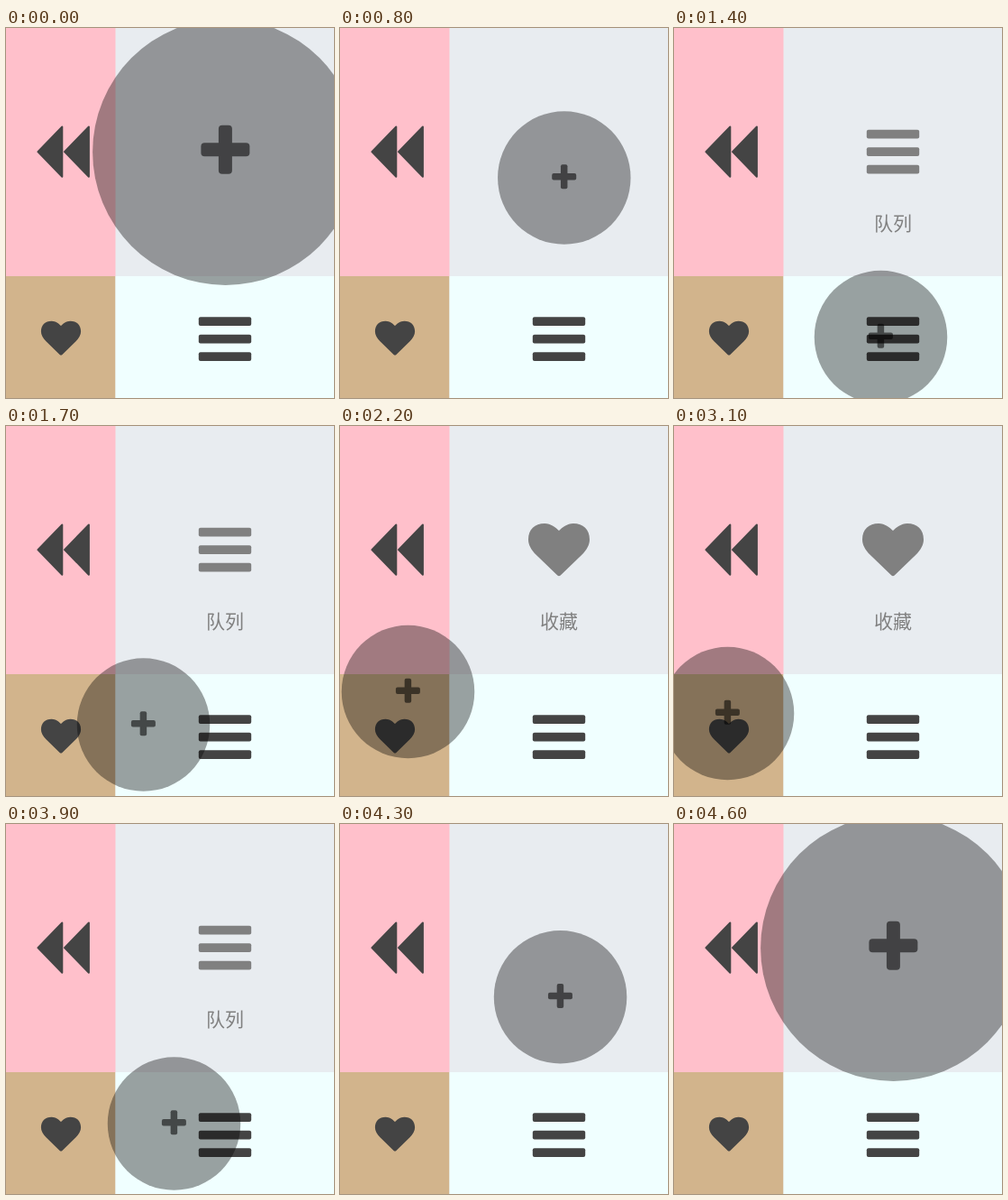
Animation of 364 by 410 pixels, one loop 5.4 s. Source, as an HTML page:

```html
<!DOCTYPE html>
<html lang="zh">
<head>
<meta charset="utf-8">
<style>
  html, body { margin: 0; width: 100%; height: 100%; overflow: hidden; background: #e8ecf0; }
  svg { display: block; width: 364px; height: 410px; }
  text { font: 21px "Noto Sans CJK SC", "Noto Sans CJK", sans-serif; text-anchor: middle; }
</style>
</head>
<body>
<svg viewBox="0 0 364 410">
  <defs>
    <path id="heart" d="M34 58.3Q33 58.3 32.3 57.6L8.65 34.8C3 29.2 0 23.5 0 17.8C0 6.5 7 0 18.1 0C25 0 30.5 4.6 34 8.1C37.5 4.6 43 0 49.9 0C61 0 68 6.5 68 17.8C68 23.5 65 29.2 59.35 34.8L35.7 57.6Q35 58.3 34 58.3Z"/>
    <g id="menu">
      <rect width="58.4" height="9.8" rx="2"/>
      <rect y="19.5" width="58.4" height="9.8" rx="2"/>
      <rect y="39" width="58.4" height="9.8" rx="2"/>
    </g>
    <path id="rewind" d="M1.4 29.3L28.3 1.7V56.9ZM31 29.3L57.9 1.7V56.9Z" stroke-width="2" stroke-linejoin="round"/>
  </defs>

  <rect width="364" height="410" fill="#e8ecf0"/>
  <rect width="121.5" height="275" fill="#ffc0cb"/>
  <rect y="275" width="121.5" height="135" fill="#d2b48c"/>
  <rect x="121.5" y="275" width="242.5" height="135" fill="#f0ffff"/>

  <g fill="#444" stroke="none">
    <use href="#rewind" x="34" y="107.8" stroke="#444"/>
    <use href="#menu" x="213.8" y="320.2"/>
    <use href="#heart" transform="translate(38.9 324.7) scale(.65)"/>
  </g>

  <g id="preview" fill="#808080">
    <use id="icon"/>
    <text id="label" x="243" y="223.5"></text>
  </g>

  <g id="knob">
    <circle r="73.75" fill-opacity=".37"/>
    <g opacity=".55" transform="translate(-.1 -1.3)">
      <rect x="-13.5" y="-3.75" width="27" height="7.5" rx="2"/>
      <rect x="-3.75" y="-13.5" width="7.5" height="27" rx="2"/>
    </g>
  </g>
</svg>
<script>
  const LOOP = 5400, STEP = 100, GRAB = 800, RELEASE = 4600;
  const el = id => document.getElementById(id);

  // Drag path: time, x, y
  const path = [
    [800, 248.8, 166], [1300, 229.5, 339.7], [1400, 229.5, 342.5],
    [1500, 229.5, 342.5], [1900, 75.5, 319.5],
    [2100, 75.5, 319.5], [2200, 75.5, 294.5], [2500, 66, 186],
    [2700, 66, 186], [3100, 59.5, 318.5],
    [3300, 59.5, 318.5], [3900, 186.5, 332],
    [4000, 186.5, 332], [4400, 254.5, 167.7], [4600, 254.5, 167.7]
  ];

  const previews = {
    menu: { x: 213.8, y: 112.7, label: '队列' },
    heart: { x: 209, y: 108, label: '收藏' },
    rewind: { x: 213.7, y: 107.8, label: '上一首' }
  };

  const ease = p => (1 - Math.cos(Math.PI * p)) / 2;

  function knobAt(time) {
    if (time < GRAB || time >= RELEASE) return { x: 243.6, y: 137.4, scale: 2 };
    const i = path.findIndex(key => key[0] > time);
    const [t0, x0, y0] = path[i - 1], [t1, x1, y1] = path[i];
    const p = ease((time - t0) / (t1 - t0));
    return { x: x0 + (x1 - x0) * p, y: y0 + (y1 - y0) * p, scale: 1 };
  }

  function zoneAt({ x, y }) {
    if (x < 121.5) return y < 275 ? 'rewind' : 'heart';
    return y < 275 ? null : 'menu';
  }

  function render(ms) {
    const time = Math.floor((ms % LOOP) / STEP) * STEP;
    const knob = knobAt(time), zone = zoneAt(knob);
    el('knob').setAttribute('transform', `translate(${knob.x} ${knob.y}) scale(${knob.scale})`);
    el('preview').style.display = zone ? '' : 'none';
    if (!zone) return;
    const { x, y, label } = previews[zone], icon = el('icon');
    icon.setAttribute('href', '#' + zone);
    icon.setAttribute('x', x);
    icon.setAttribute('y', y);
    icon.setAttribute('stroke', zone === 'rewind' ? '#808080' : 'none');
    el('label').textContent = label;
  }

  const start = performance.now();
  function tick() {
    render(performance.now() - start);
    requestAnimationFrame(tick);
  }
  tick();
</script>
</body>
</html>
```
